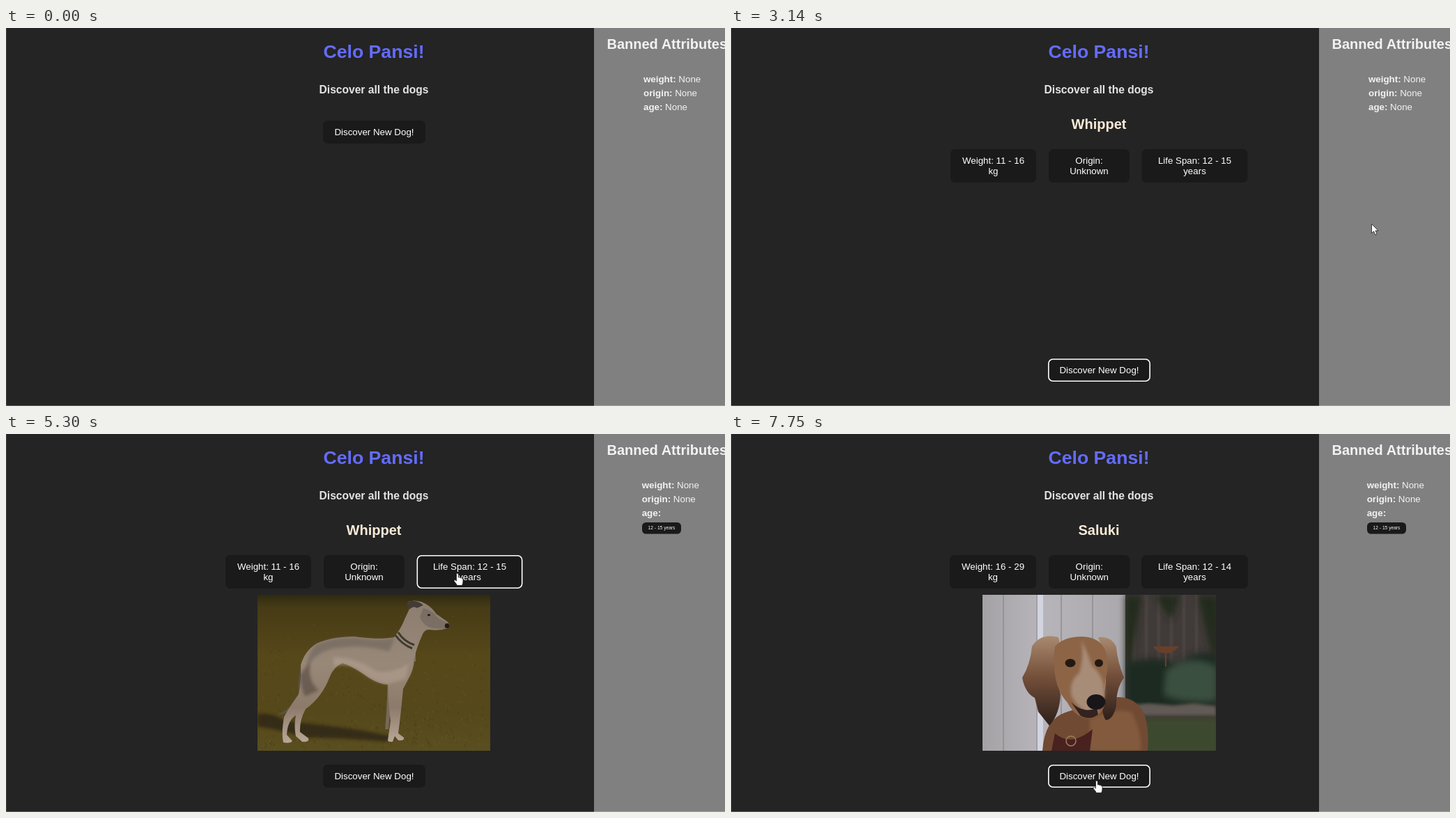
Recreate the animation shown at these times as an HTML page. Size 1032 px wide and 543 px high, loop 8 s.

```html
<!DOCTYPE html>
<html lang="en">
<head>
<meta charset="utf-8">
<title>Discover all the dogs</title>
<style>
  html, body { margin: 0; width: 100%; height: 100%; overflow: hidden; background: #242424; }
  svg { display: block; width: 100vw; height: 100vh; }
  text { font: 13.33px "Liberation Sans", Arial, sans-serif; fill: #fff; white-space: pre; }
  .mid text, text.mid { text-anchor: middle; }
  .b { font-weight: 700; }
  .soft { fill: #e3e3e3; }
  .side text { fill: #f2f2f2; }
  .h1 { font-size: 26.67px; fill: #646cff; }
  .h2 { font-size: 20px; }
  .h3 { font-size: 15.6px; }
  .cream { fill: #faebd7; }
  .tiny { font-size: 6.67px; }
</style>
</head>
<body>
<svg viewBox="0 0 1032 543" preserveAspectRatio="none">
  <defs>
    <linearGradient id="grass" x1="0" y1="0" x2="0" y2="1">
      <stop offset="0" stop-color="#2f2a11"/>
      <stop offset=".08" stop-color="#463b15"/>
      <stop offset=".4" stop-color="#57481a"/>
      <stop offset=".75" stop-color="#55481a"/>
      <stop offset="1" stop-color="#5a4e20"/>
    </linearGradient>
    <linearGradient id="coat" x1="0" y1="0" x2="0" y2="1">
      <stop offset="0" stop-color="#8b7d70"/>
      <stop offset=".45" stop-color="#988878"/>
      <stop offset=".75" stop-color="#8d7a6a"/>
      <stop offset="1" stop-color="#b9a797"/>
    </linearGradient>
    <linearGradient id="wall">
      <stop offset="0" stop-color="#a5a2a6"/>
      <stop offset=".4" stop-color="#b7b5ba"/>
      <stop offset="1" stop-color="#aaa8ad"/>
    </linearGradient>
    <linearGradient id="fur" x1="0" y1="0" x2="0" y2="1">
      <stop offset="0" stop-color="#a98a70"/>
      <stop offset=".45" stop-color="#75503a"/>
      <stop offset="1" stop-color="#2c1f1a"/>
    </linearGradient>
    <filter id="blur2"><feGaussianBlur stdDeviation="2"/></filter>
    <filter id="blur5"><feGaussianBlur stdDeviation="5"/></filter>
    <clipPath id="load"><rect id="loaded" x="361" y="231" width="334" height="224"/></clipPath>
    <clipPath id="frame"><rect x="361" y="231" width="335" height="224"/></clipPath>
  </defs>

  <rect width="1032" height="543" fill="#242424"/>
  <rect width="1" height="543" fill="#404040"/>
  <rect x="844" width="188" height="543" fill="#808080"/>
  <rect y="542" width="1032" height="1" fill="#fff" opacity=".25"/>

  <g class="mid">
    <text class="b h1" x="528" y="43">Celo Pansi!</text>
    <text class="b h3 soft" x="528" y="94">Discover all the dogs</text>
  </g>

  <g class="side">
    <text class="b h2" x="862.5" y="30">Banned Attributes</text>
    <g id="list">
      <text x="915" y="78"><tspan class="b">weight:</tspan> None</text>
      <text x="915" y="98"><tspan class="b">origin:</tspan> None</text>
      <text x="915" y="118"><tspan class="b">age:</tspan><tspan id="none"> None</tspan></text>
    </g>
    <g id="chip">
      <rect x="913" y="127" width="56" height="16.5" rx="5.5" fill="#1a1a1a"/>
      <text class="tiny mid" x="941" y="137">12 - 15 years</text>
    </g>
  </g>

  <g id="card" class="mid">
    <text id="breed" class="b h2 cream" x="528" y="145"></text>
    <g id="tags"></g>

    <g id="whippet" clip-path="url(#load)">
      <rect x="361" y="231" width="334" height="224" fill="url(#grass)"/>
      <g id="blades" fill="none"></g>
      <path d="M361 402Q385 400 400 412L470 420Q520 426 560 436L545 442Q480 436 430 436Q390 424 361 420Z" fill="#292312" opacity=".75" filter="url(#blur2)"/>
      <path d="M426 325Q418 345 420 372Q410 396 389 403Q409 404 424 376Z" fill="#5f5147"/>
      <path d="M548 355L546 400L544 424L549 424L556 360Z" fill="#77685a"/>
      <path d="M577 241Q586 238 596 241Q611 247 617 258L634 270Q638 276 634 279Q622 283 607 281Q600 281 597 290Q590 305 586 322Q586 338 577 353L570 366Q567 400 563 430L571 436Q572 441 563 440L558 434L555 442Q549 443 548 440L552 412Q549 390 548 360Q536 360 519 349Q500 335 483 329Q471 334 465 348Q454 378 430 395Q421 412 422 428L434 437Q436 443 425 442L416 434Q413 420 416 404Q404 412 403 432L411 441Q408 445 398 443Q395 430 399 407Q404 396 420 374Q424 355 423 332Q429 311 446 301Q467 291 500 291Q536 296 557 292Q567 280 573 264Q577 256 579 251Z" fill="url(#coat)"/>
      <path d="M446 302Q470 291 502 292Q536 298 558 293L550 312Q510 302 480 307Q450 308 432 334Q434 312 446 302Z" fill="#6b6058" opacity=".55" filter="url(#blur2)"/>
      <path d="M470 320Q505 322 530 340Q555 345 578 330L574 352L548 359Q530 358 508 340Q490 328 470 334Z" fill="#b6a394" opacity=".55" filter="url(#blur2)"/>
      <path d="M422 346Q423 364 429 377L449 368Q432 355 437 326Z" fill="#4c4039" opacity=".55" filter="url(#blur2)"/>
      <path d="M575 242Q588 236 599 246L590 250Q585 246 579 252Z" fill="#453b35"/>
      <path d="M599 250Q612 253 620 264L634 272L630 280L612 279Q599 276 594 263Z" fill="#756961" opacity=".75"/>
      <ellipse cx="633" cy="275.500" rx="3.200" ry="3.500" fill="#211c1a"/>
      <ellipse cx="607" cy="260" rx="2.200" ry="1.600" fill="#211c1a"/>
      <path d="M559 289Q568 302 583 308M563 285Q571 298 586 303" fill="none" stroke="#3f392d" stroke-width="3"/>
      <path d="M561 287Q570 300 584 305.500M587 309V327" fill="none" stroke="#93897a" stroke-width="1.300"/>
    </g>

    <g id="saluki" clip-path="url(#frame)">
      <rect x="361" y="231" width="207" height="224" fill="url(#wall)"/>
      <path d="M391 231V455M474 231V455M519 231V455" stroke="#8e8b91" stroke-width="1.500"/>
      <path d="M444 231V455" stroke="#d2d5df" stroke-width="8"/>
      <path d="M439 231V455" stroke="#8c8a91" stroke-width="1"/>
      <rect x="566" y="231" width="130" height="224" fill="#403a38"/>
      <path d="M578 231V330M596 231V330M614 231V330M632 231V330M650 231V330M668 231V330" stroke="#514843" stroke-width="5" opacity=".6"/>
      <g filter="url(#blur5)">
        <path d="M566 231H590L578 300L566 390ZM670 231H700V350L686 300ZM608 231H645L632 268Z" fill="#202b1b"/>
        <path d="M566 330Q610 315 640 330Q670 305 700 320V395H566Z" fill="#1f2923"/>
        <path d="M625 340Q660 315 696 335V382Q660 388 622 375Z" fill="#3b5040"/>
        <path d="M566 408H700V460H590Z" fill="#3e4a2f"/>
      </g>
      <path d="M566 390L600 387L635 390L664 387L696 391V404H566Z" fill="#625a55" filter="url(#blur2)"/>
      <path d="M607 306H641Q633 314 624 314Q614 314 607 306M624 314V334" fill="#67402c" stroke="#67402c" stroke-width="2"/>
      <path d="M447 455Q450 410 480 400L540 380Q574 372 591 397Q601 419 598 455Z" fill="#714a33"/>
      <path d="M515 410Q550 392 575 400Q590 425 588 455H515Z" fill="#835a3e" filter="url(#blur2)"/>
      <path d="M470 292Q445 285 432 305Q430 330 418 350Q422 372 436 379L441 399L457 419Q472 402 473 374Q465 340 474 310Z" fill="url(#fur)"/>
      <path d="M527 292Q546 290 553 306Q555 328 564 350Q553 365 553 390Q549 410 538 411Q529 398 536 370Q543 335 527 292Z" fill="url(#fur)"/>
      <path d="M465 305Q478 291 503 291Q528 291 537 310Q544 331 538 350Q535 368 537 388Q530 408 513 409Q494 407 483 386Q470 372 466 352Q461 326 465 305Z" fill="#8d6446"/>
      <path d="M503 296Q512 315 518 333Q537 348 536 377L522 403Q501 399 489 377Q484 356 500 343Q507 320 503 296Z" fill="#a78c77" filter="url(#blur2)"/>
      <path d="M488 385Q505 402 525 394L527 403Q516 412 502 405Z" fill="#33221f"/>
      <ellipse cx="524" cy="385" rx="13.500" ry="11" fill="#191619"/>
      <ellipse cx="487" cy="329" rx="7.500" ry="6" fill="#241813"/>
      <ellipse cx="528" cy="329" rx="6" ry="5.500" fill="#241813"/>
      <path d="M465 430Q488 450 519 424L515 455H460Z" fill="#49211f"/>
      <circle cx="488" cy="441" r="7" fill="none" stroke="#a27c5c" stroke-width="1.500"/>
    </g>
  </g>

  <g id="main" class="mid"></g>

  <g id="cursor" fill="#fff" stroke="#1c1c1c" stroke-width=".8" stroke-linejoin="round">
    <path id="arrow" d="M0 0V13.300L3.100 10.400L5.400 15.700L7.700 14.700L5.500 9.600H9.500Z"/>
    <path id="hand" d="M-1.500 1.500A1.400 1.400 0 0 1 1.300 1.500V6Q3 5 4 6.600Q5.600 5.800 6.500 7.400Q8 7 8 9V12Q8 15 6.500 17.500H-.5Q-2 14.500-4.800 11.500Q-5.500 9.600-3.600 9.400L-1.500 11Z"/>
  </g>
</svg>
<script>
const LOOP = 8000, STEP = 70, FADE = 250;
const $ = id => document.getElementById(id);
const show = (el, on) => el.setAttribute('visibility', on ? 'inherit' : 'hidden');

const RUNS = [
  [390, 1130, [[958, 511], [932, 470], [882, 412], [822, 352], [757, 298], [700, 253],
    [650, 215], [612, 188], [588, 170], [575, 164], [566, 163], [563, 162]]],
  [1790, 1930, [[600, 182], [820, 260], [919.5, 281.5]]],
  [4140, 4900, [[915, 281], [893, 274], [862, 264], [826, 253], [785, 243], [742, 234],
    [705, 226], [683, 204.5], [677, 199], [675, 196], [674, 195], [674, 194]]],
  [4970, 4970, [[679, 194]]],
  [5300, 5650, [[648, 200], [565, 206], [520, 230], [505, 258], [500, 285], [499, 306]]],
  [5940, 6550, [[506, 379.5], [511, 410], [517, 440], [521, 466], [523, 482], [524, 492],
    [525, 497], [525, 498], [525, 498], [525, 498]]]
];
const POINTS = RUNS.flatMap(([from, to, list]) =>
  list.map(([x, y], i) => ({ at: Math.min(from + STEP * i, to), x, y })));

function makeButton(parent, x, y, w, h, lines) {
  const g = document.createElementNS('http://www.w3.org/2000/svg', 'g');
  g.innerHTML = `<rect fill="#1a1a1a"/><rect fill="none"/>` + lines.map(s => `<text>${s}</text>`).join('');
  parent.append(g);
  const [box, ring, ...texts] = g.children;
  const button = { x, y, w, h, texts };
  button.place = (x, y, w) => {
    Object.assign(button, { x, y, w });
    setRect(box, 0, 6.7);
    texts.forEach((el, i) => {
      el.setAttribute('x', x + w / 2);
      el.setAttribute('y', y + 21 + i * 15);
    });
  };
  const setRect = (el, inset, r) => {
    const a = { x: button.x + inset, y: button.y + inset, width: button.w - 2 * inset, height: h - 2 * inset, rx: r };
    for (const k in a) el.setAttribute(k, a[k]);
  };
  button.outline = (focus, hover) => {
    const width = focus ? 1.6 : 0.85;
    setRect(ring, width / 2, 6.7 - width / 4);
    ring.setAttribute('stroke', focus ? '#fff' : '#646cff');
    ring.setAttribute('stroke-width', width);
    ring.setAttribute('stroke-opacity', focus ? 1 : hover);
  };
  button.hit = p => p.x >= button.x && p.x <= button.x + button.w && p.y >= button.y && p.y <= button.y + h;
  button.place(x, y, w);
  return button;
}

const weight = makeButton($('tags'), 315, 174, 123, 48, ['', 'kg']);
const origin = makeButton($('tags'), 456, 174, 116, 48, ['Origin:', 'Unknown']);
const life = makeButton($('tags'), 589.5, 174, 152, 48, ['', 'years']);
const main = makeButton($('main'), 455, 133, 147, 33, ['Discover New Dog!']);

// Faint grass strokes
let seed = 7;
const rnd = () => (seed = seed * 16807 % 2147483647) / 2147483647;
$('blades').innerHTML = ['#6d5e29', '#3c3312'].map(color => {
  let d = '';
  for (let i = 0; i < 170; i++) {
    const depth = Math.sqrt(rnd());
    d += `M${361 + rnd() * 334} ${255 + depth * 198}l${rnd() * 6 - 3} ${-1 - depth * 3}`;
  }
  return `<path d="${d}" stroke="${color}" opacity=".55"/>`;
}).join('');

const ease = p => 1 - (1 - Math.min(1, Math.max(0, p))) ** 2;
const hover = (t, on, off) => ease((t - on) / FADE) - ease((t - off) / FADE);
const within = (t, a, b) => t >= a && t < b;

function draw(t) {
  const card = t >= 3140, second = t >= 7480, banned = t >= 4970;
  const pointer = POINTS.filter(p => p.at <= t).pop();
  const held = pointer ? pointer.at : 0;

  show($('card'), card);
  $('breed').textContent = second ? 'Saluki' : 'Whippet';
  weight.texts[0].textContent = 'Weight: ' + (second ? '16 - 29' : '11 - 16');
  life.texts[0].textContent = 'Life Span: 12 - ' + (second ? '14' : '15');
  weight.place(second ? 314 : 315, 174, second ? 124 : 123);
  origin.place(456, 174, second ? 116.5 : 116);
  life.place(second ? 589 : 589.5, 174, second ? 153 : 152);
  main.place(455, card ? 475 : 133, 147);

  show($('whippet'), within(t, 3280, 7750) && card);
  $('loaded').setAttribute('height', t < 3480 ? 33 : 224);
  show($('saluki'), t >= 7750);

  $('list').setAttribute('transform', `translate(${banned ? -2.3 : 0} 0)`);
  show($('none'), !banned);
  show($('chip'), banned);

  main.outline(within(t, 1210, 4840) || t >= 6480,
    t < 4000 ? hover(held, 990, 1790) : hover(held, 6170, LOOP));
  life.outline(within(t, 4840, 6480), hover(held, 4590, 5320));
  origin.outline(false, hover(held, 5340, 5410));
  weight.outline(false, 0);

  show($('cursor'), pointer);
  if (pointer) {
    const over = main.hit(pointer) || card && [weight, origin, life].some(b => b.hit(pointer));
    $('cursor').setAttribute('transform', `translate(${pointer.x} ${pointer.y})`);
    show($('arrow'), !over);
    show($('hand'), over);
  }
}

const start = performance.now();
function tick() {
  draw((performance.now() - start) % LOOP);
  requestAnimationFrame(tick);
}
tick();
</script>
</body>
</html>
```
